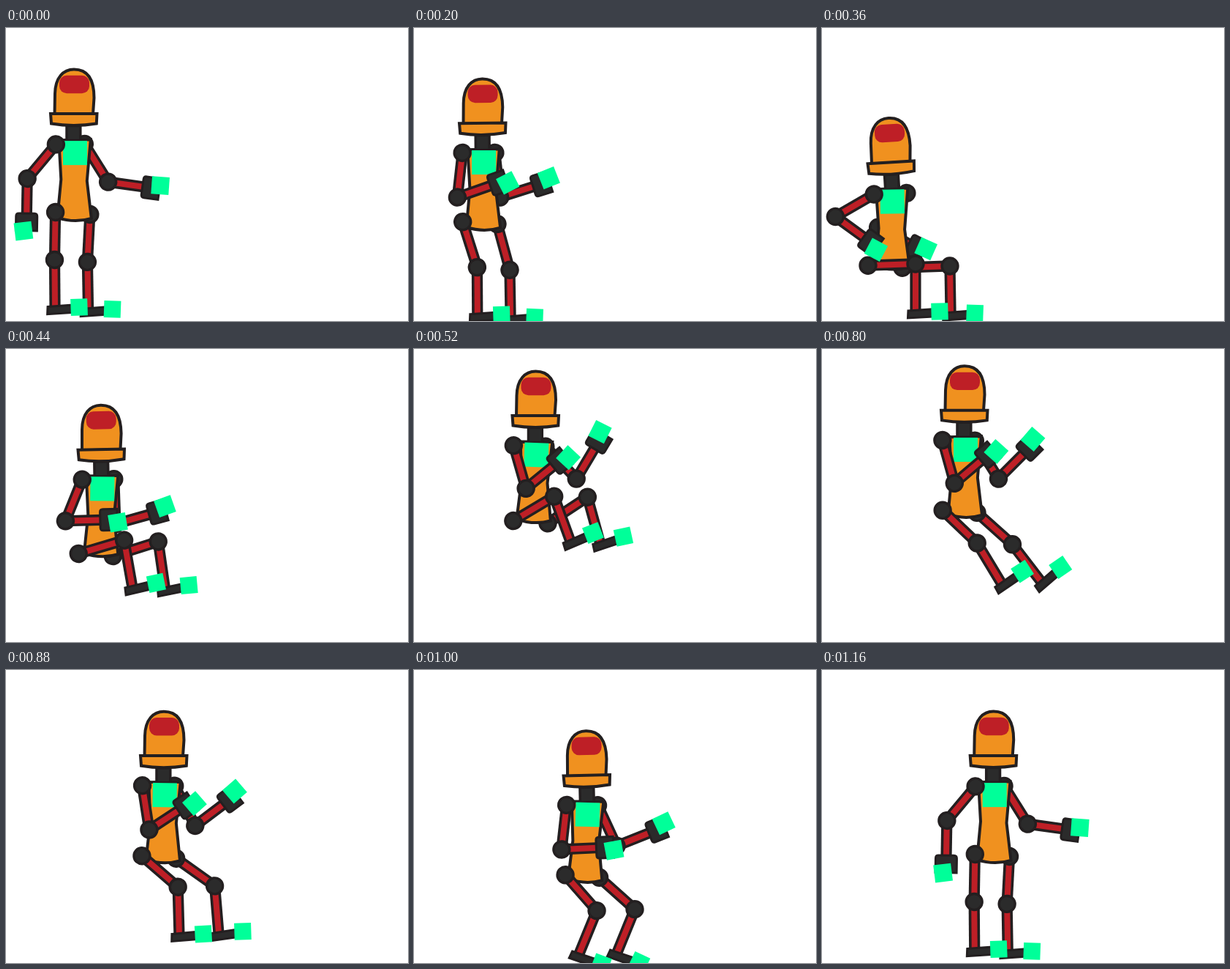
Write an HTML page with a canvas that moves like this. It is 550 px wide and 400 px high and loops after 1.2 s.

```html
<!DOCTYPE html>
<html lang="en">
<head>
<meta charset="utf-8">
<title>Robot jump</title>
<style>
html, body { margin: 0; width: 100%; height: 100%; overflow: hidden; background: #fff; }
canvas { display: block; width: 550px; height: 400px; }
</style>
</head>
<body>
<canvas id="stage" width="550" height="400"></canvas>
<script>
const ctx = document.getElementById('stage').getContext('2d');
const LOOP = 1200, STEP = 40, JUMP = 141.7, RAD = Math.PI / 180;
const ORANGE = '#f0911f', RED = '#be1f26', LINE = '#231f20', DARK = '#2b2b2b', GREEN = '#00ff99';

// Each pose: head x, y and torso lean, then upper and lower angle of
// far arm, far leg, near leg and near arm, in degrees from straight down.
const stand = [92.5, 117.5, 0, 32, 82, -3, 1, -1, 0.5, -40, -1];
const ready = [93.4, 117, 0, 18, 119, -4, 1, -1, 0.5, 7, 123];
const crouch = [94, 184, -0.8, -40, 62, 92, 1, 92, 0, -60, 54];
const tuck = [184, 68.4, 2.5, 65, 171, 131, 19, 128, 25, 35, 148];
const reach = [184, 67.7, -0.6, 34, 139, 45, 54, 45, 46, 19, 134];
const land = [236.5, 151, 2, 23, 119, 61, -28, 52, -28, 2, 116];
const end = [stand[0] + JUMP, ...stand.slice(1)];
const keys = [[0, stand], [160, ready], [360, crouch], [560, tuck], [760, reach], [960, land], [1160, end]];

function poseAt(t) {
  const i = keys.findLastIndex(([start]) => start <= t);
  if (i === keys.length - 1) return end;
  const [t0, a] = keys[i], [t1, b] = keys[i + 1];
  return a.map((v, j) => v + (b[j] - v) * (t - t0) / (t1 - t0));
}

function at(x, y, deg, draw) {
  ctx.save();
  ctx.translate(x, y);
  ctx.rotate(deg * RAD);
  draw();
  ctx.restore();
}

function shape(d, fill, width) {
  const path = new Path2D(d);
  ctx.fillStyle = fill;
  ctx.fill(path);
  ctx.strokeStyle = LINE;
  ctx.lineWidth = width;
  ctx.stroke(path);
}

function bar(from, to) {
  ctx.fillStyle = LINE;
  ctx.fillRect(-7.6, from, 15.2, to - from);
  ctx.fillStyle = RED;
  ctx.fillRect(-4, from, 8, to - from);
}

function joint(y) {
  ctx.beginPath();
  ctx.arc(0, y, 11, 0, 7);
  ctx.fillStyle = DARK;
  ctx.fill();
  ctx.strokeStyle = LINE;
  ctx.lineWidth = 3.4;
  ctx.stroke();
}

function square(x, y, size, deg) {
  at(x, y, deg, () => {
    ctx.fillStyle = GREEN;
    ctx.fillRect(-size / 2, -size / 2, size, size);
  });
}

const HAND = 'M-14.5 51.5Q-14.5 47.5-10.5 47.5H10.5Q14.5 47.5 14.5 51.5V71H-14.5Z';
const FOOT = 'M-10 64L37 61V71.5L-10.5 74Z';

// The lower part of a limb, ending in a hand or a foot
const hand = (side, deg) => () => {
  bar(0, 48);
  shape(HAND, DARK, 3);
  square(side, 71.5, 24, deg);
};
const foot = deg => () => {
  bar(0, 64);
  shape(FOOT, DARK, 3);
  square(33, 65, 23, deg);
};

// The upper part turns about a point just below its first joint
function limb(x, y, len, up, low, tip) {
  at(x, y, -up, () => {
    bar(-6, len);
    at(0, len, up - low, tip);
    joint(-6);
    joint(len);
  });
}

function drawBody(x, y, lean) {
  const nod = -Math.max(0, y - 118) / 19;
  const torso = draw => at(x + 1.3, y + 35.3, lean, draw);
  const head = draw => at(x, y, nod, draw);
  torso(() => shape('M-21.5 .5L-18.5 54L-23.5 106Q0 114 23 107L17 56L22-.5Z', ORANGE, 4));
  head(() => shape('M-9.5 16H9.3V36H-9.5Z', DARK, 3.5));
  torso(() => square(0.7, 17.8, 33, 0));
  head(() => {
    shape('M-26 0L-25.5-28C-25-50-14-61 .5-61C17-61 28-50 28-22L26.5 0Z', ORANGE, 4);
    shape('M-31.5-.6H32L31.3 13Q0 18-30.5 13Z', ORANGE, 4);
    ctx.beginPath();
    ctx.roundRect(-19.5, -52.7, 41, 24.4, 10);
    ctx.fillStyle = RED;
    ctx.fill();
  });
}

function draw(t) {
  const [x, y, lean, ...a] = poseAt(t);
  ctx.clearRect(0, 0, 550, 400);
  limb(x + 18, y + 46, 55, a[0], a[1], hand(5, -4));
  limb(x + 22, y + 143, 59, a[2], a[3], foot(3));
  drawBody(x, y, lean);
  limb(x - 25, y + 140, 59, a[4], a[5], foot(-1.5));
  limb(x - 28, y + 46, 55, a[6], a[7], hand(-4, -8));
}

const start = performance.now();
function tick() {
  const t = Math.max(0, performance.now() - start) % LOOP;
  draw(Math.floor(t / STEP) * STEP);
  requestAnimationFrame(tick);
}
tick();
</script>
</body>
</html>
```
